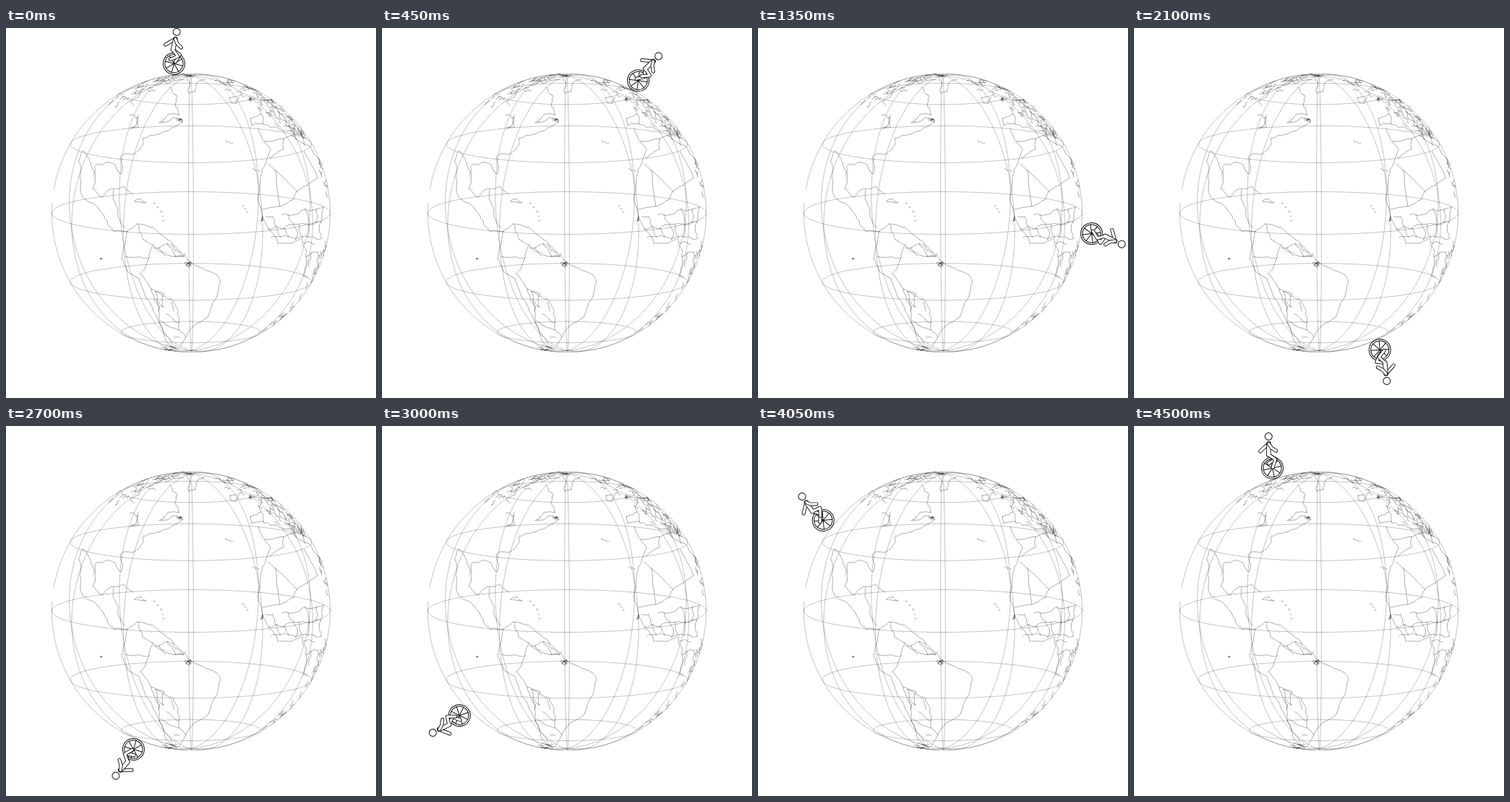
Write an HTML page that moves like this. It is 512 px wide and 512 px high and loops after 4650 ms.

```html
<!DOCTYPE html>
<html lang="en">
<head>
<meta charset="utf-8">
<title>Unicycle around the globe</title>
<style>
html, body { margin: 0; width: 100%; height: 100%; overflow: hidden; background: #fff; }
svg { display: block; width: 100vw; height: 100vh; fill: none; stroke: #111; stroke-linejoin: round; stroke-linecap: round; }
#grid { stroke-width: .25; }
#land { stroke-width: .34; }
#rider { stroke-width: 1; }
.limb { stroke-width: 5; }
.limb.fill { stroke: #fff; stroke-width: 3.2; }
.trunk { stroke-width: 6.6; }
.trunk.fill { stroke: #fff; stroke-width: 4.8; }
</style>
</head>
<body>
<svg viewBox="0 0 512 512">
  <g id="grid"></g>
  <g id="land"></g>
  <g id="rider">
    <g id="wheel"><circle r="15"/><circle r="12.6"/></g>
    <g id="body"></g>
    <circle cy="-44" r="5"/>
  </g>
</svg>
<script>
const $ = id => document.getElementById(id);
const rad = Math.PI / 180;
const C = 256, R = 192.6, TILT = 8.8 * rad;

function add(parent, d, cls = '') {
  const p = document.createElementNS('http://www.w3.org/2000/svg', 'path');
  p.setAttribute('d', d);
  p.setAttribute('class', cls);
  parent.append(p);
  return p;
}
const line = pts => 'M' + pts.map(p => p[0].toFixed(2) + ' ' + p[1].toFixed(2)).join('L');
const polar = (r, a) => [r * Math.cos(a), r * Math.sin(a)];
const onDisc = (r, a) => polar(r, a).map(v => v + C);
const mix = (a, b, t) => a.map((v, i) => v + (b[i] - v) * t);
const times = (n, f) => Array.from({ length: n }, (_, i) => f(i));

let seed = 11;
const rnd = () => (seed = seed * 16807 % 2147483647) / 2147483647;
const jit = s => (rnd() - .5) * 2 * s;

// Wireframe: parallels and meridians of a tilted sphere
function project(lon, lat) {
  const c = Math.cos(lat * rad);
  return [
    C + R * c * Math.sin(lon * rad),
    C - R * (Math.sin(lat * rad) * Math.cos(TILT) - c * Math.cos(lon * rad) * Math.sin(TILT))
  ];
}
const ring = f => add($('grid'), line(times(121, i => f(i * 3))));
for (let lat = -60; lat <= 60; lat += 30) ring(a => project(a, lat));
for (let lon = 1; lon < 180; lon += 30) {
  if (lon !== 91) ring(a => project(lon, a));
}
add($('grid'), line(times(119, i => onDisc(R, (190 + i * 3) * rad))));

// Land: key points joined by fractal lines
function rough(pts, amt, depth = 3) {
  if (!depth) return pts;
  const out = [pts[0]];
  for (let i = 1; i < pts.length; i++) {
    const a = pts[i - 1], b = pts[i];
    const s = amt * Math.hypot(b[0] - a[0], b[1] - a[1]);
    out.push(mix(a, b, .5).map(v => v + jit(s)), b);
  }
  return rough(out, amt, depth - 1);
}
const trace = (pts, amt = .15) => add($('land'), line(rough(pts, amt)));
const coast = (s, amt) => trace(s.split(' ').map(p => p.split(',').map(Number)), amt);

// North and Central America
coast('107,170 103,192 106,234 130,253 150,282 168,281');
coast('107,170 116,184 124,203 120,222 133,234 142,224 150,222 148,236 155,250 164,276', .1);
coast('121,206 124,190 149,188 159,202 158,178 178,174 190,152 217,144 244,130');
coast('244,130 231,124 212,131 240,120 234,106 237,96 226,82', .22);
coast('152,223 164,220 176,230', .12);
coast('178,240 186,236 194,242 178,240');
coast('171,121 183,124 172,139 184,137 183,120', .25);
coast('177,107 172,101 188,87 196,76', .22);

// South America
coast('168,281 181,271 205,277 230,297 252,322 292,342 297,349 284,386 279,400 262,410 245,434 237,445', .1);
coast('168,281 160,319 168,337 184,346 204,392 220,430 237,446', .1);
coast('183,272 190,293 203,300 198,318 165,316');
coast('198,318 186,340 201,361 213,410 230,438', .12);
coast('203,300 215,310 236,316 249,313');
coast('201,361 217,371 231,377 240,403 240,418 249,428', .12);

// Greenland and Europe
coast('250,68 253,91 262,88 263,80 275,71', .2);
coast('310,96 322,96 319,105 310,96', .25);
coast('338,125 353,119 356,133 340,135 338,125');
coast('353,119 352,100 370,102', .25);
coast('356,133 374,137 389,143 398,138', .25);

// Africa
coast('349,139 358,157 397,148 422,166 438,188', .1);
coast('358,157 366,169 352,212 353,250 376,298 409,291 416,309 412,345', .1);
coast('365,180 384,168 384,153', .1);
coast('363,188 402,226 431,207 413,171', .03);
coast('373,196 379,247 355,251', .04);
coast('402,226 397,238 379,247', .1);

// Country borders: jittered mesh over a quad, some edges left out
function mesh(a, b, c, d, cols, rows, keep) {
  const node = times(rows + 1, j => times(cols + 1, i =>
    mix(mix(a, b, i / cols), mix(d, c, i / cols), j / rows).map(v => v + jit(3))));
  for (let j = 0; j <= rows; j++) for (let i = 0; i <= cols; i++) {
    if (i < cols && rnd() < keep) trace([node[j][i], node[j][i + 1]]);
    if (j < rows && rnd() < keep) trace([node[j][i], node[j + 1][i]]);
  }
}
mesh([357, 262], [440, 250], [436, 292], [370, 290], 7, 2, .75);
mesh([412, 300], [438, 296], [426, 345], [412, 345], 2, 3, .6);
mesh([360, 105], [400, 130], [415, 160], [372, 130], 5, 3, .5);
mesh([204, 362], [230, 380], [242, 430], [218, 420], 2, 4, .6);
mesh([203, 302], [232, 300], [246, 314], [212, 314], 3, 1, .7);

// Island chains
const islet = (x, y) => trace([[x, y], [x + 2, y + 1]], .5);
times(5, i => islet(204 + 13 * Math.sin(i * .4), 242 + i * 6));
times(3, i => islet(304 + i * 4, 157 + i));
times(3, i => islet(341 + i * 4, 195 + i));
times(3, i => islet(327 + i * 3, 246 + i * 4));

// Crowded coasts seen edge-on near the rim
function crowd(from, to, depth, count) {
  for (let i = 0; i < count; i++) {
    const a = (from + rnd() * (to - from)) * rad, r = R - 1 - rnd() * rnd() * depth;
    trace(times(4, k => onDisc(Math.min(R, r + jit(2)), a + (k - 1.5) * 3 / R)), .3);
  }
}
crowd(-128, -102, 18, 18);
crowd(-105, -89, 10, 18);
crowd(-80, -55, 24, 26);
crowd(-55, -33, 24, 34);
crowd(-32, 0, 8, 8);
crowd(10, 60, 6, 20);
crowd(97, 101, 7, 8);

// Small dark knots
const knot = (x, y, w, h, n) => add($('land'), line(times(n, () => [x + jit(w), y + jit(h)])));
knot(252, 327, 5, 4, 18);
knot(132, 319, 2, 1.5, 10);
knot(354, 265, 1.8, 5, 10);
knot(240, 127, 5, 3, 12);
knot(338, 99, 4, 3, 12);

// Rider, in a frame whose origin is the hub
times(8, i => add($('wheel'), line([[0, 0], polar(12.6, i * 45 * rad)])));

// Each group gets all its outlines first, so its parts join smoothly
function group(...kinds) {
  const layers = ['', ' fill'].map(f => kinds.map(k => add($('body'), '', k + f)));
  return kinds.map((_, i) => layers.map(l => l[i]));
}
const bend = (parts, pts) => parts.forEach(p => p.setAttribute('d', line(pts)));
const [backArm] = group('limb'), [backLeg] = group('limb');
const [trunk, frontLeg] = group('trunk', 'limb');
const [frontArm] = group('limb');
const SHOULDER = [-1, -34], HIP = [-3, -19], BONE = 11.5, CRANK = 4;
bend(trunk, [SHOULDER, HIP]);
bend(backArm, [SHOULDER, [-7, -30], [-14, -25]]);
bend(frontArm, [SHOULDER, [2, -28], [8, -23]]);

function leg(parts, phase) {
  const foot = polar(CRANK, phase).map((v, i) => v - 2 * (i + 1));
  const dx = foot[0] - HIP[0], dy = foot[1] - HIP[1], d = Math.hypot(dx, dy);
  const k = Math.sqrt(Math.max(0, BONE * BONE - d * d / 4)) / d;
  const knee = [HIP[0] + dx / 2 + dy * k, HIP[1] + dy / 2 - dx * k];
  bend(parts, [HIP, knee, foot]);
}

const STEP = 150, COUNT = 31, ORBIT = 207.7, LEAN = 11.3;
function pose(i) {
  const a = -6.5 + i * 360 / COUNT;
  const [x, y] = onDisc(ORBIT, (a - 90) * rad);
  const spin = i * 360 * 13 / COUNT;
  $('rider').setAttribute('transform', `translate(${x} ${y - .4}) rotate(${a + LEAN})`);
  $('wheel').setAttribute('transform', `rotate(${spin + 10})`);
  leg(frontLeg, (spin + 200) * rad);
  leg(backLeg, (spin + 20) * rad);
}

const start = performance.now();
let shown = -1;
function tick() {
  const i = Math.floor((performance.now() - start) / STEP) % COUNT;
  if (i !== shown) pose(shown = i);
  requestAnimationFrame(tick);
}
tick();
</script>
</body>
</html>
```
